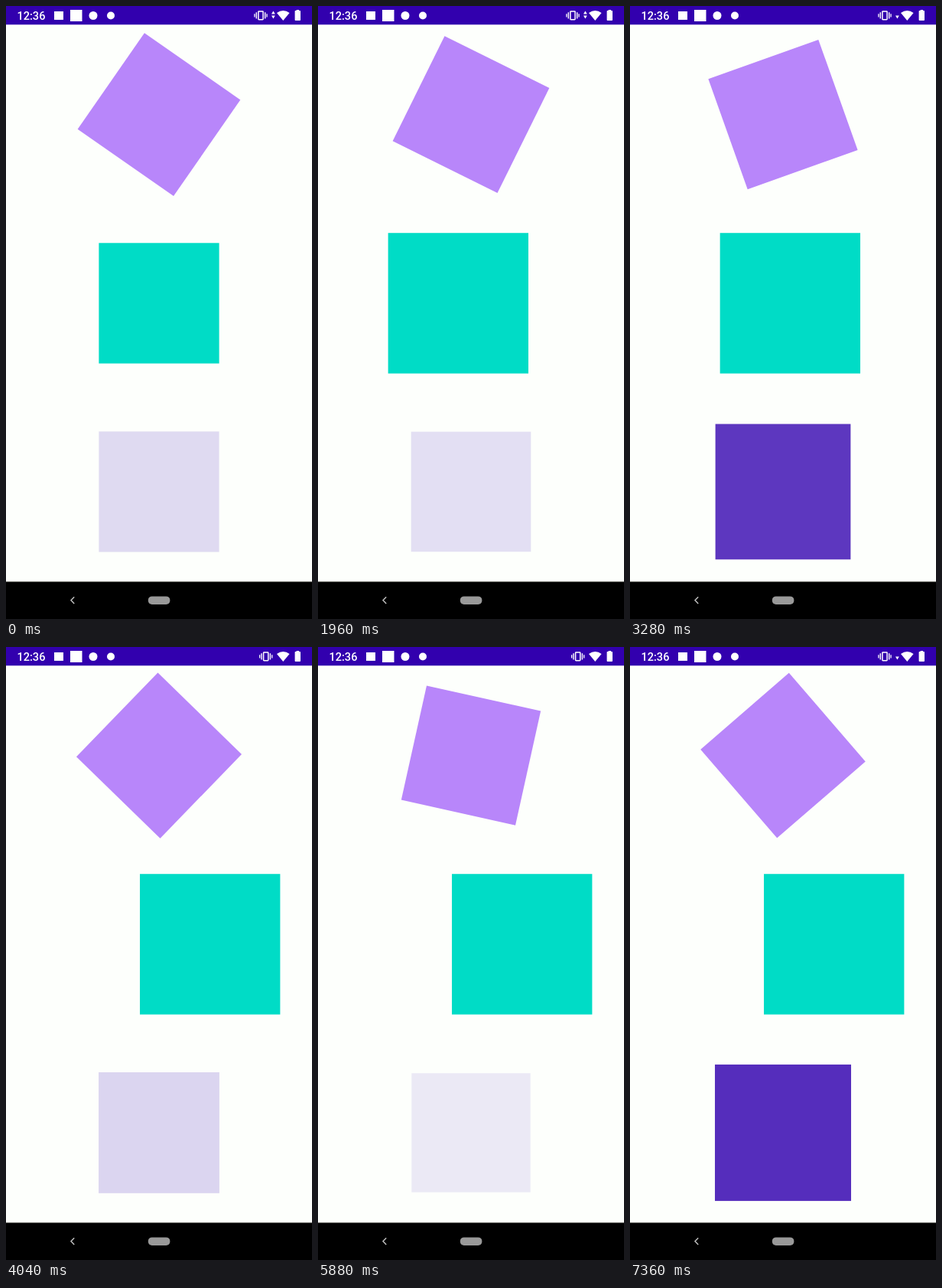
Animation, 400 px wide and 800 px high, one loop 7.4 s. Source, as an HTML page:

```html
<!DOCTYPE html>
<html lang="en">
<head>
<meta charset="utf-8">
<title>Animated squares</title>
<style>
  html, body { margin: 0; width: 100%; height: 100%; overflow: hidden; background: #fdfffc; }
  svg { display: block; width: 400px; height: 800px; }
  .clock { font: 500 14.6px Roboto, sans-serif; fill: #fff; }
</style>
</head>
<body>
<svg viewBox="0 0 400 800">
  <rect width="400" height="800" fill="#fdfffc"/>

  <rect id="spin" x="-76.4" y="-76.4" width="152.8" height="152.8" fill="#b886fa"/>
  <rect id="slide" x="-76.4" y="-76.4" width="152.8" height="152.8" fill="#00dcc6"/>
  <rect id="fade" x="-76.4" y="-76.4" width="152.8" height="152.8" fill="#3200af"/>

  <!-- status bar -->
  <rect width="400" height="24.3" fill="#3200ae"/>
  <text class="clock" x="14.4" y="18">12:36</text>
  <g fill="#fff">
    <rect x="63" y="7" width="12" height="11"/>
    <rect x="84" y="5" width="15.5" height="15"/>
    <circle cx="114" cy="12.5" r="5.5"/>
    <circle cx="137" cy="12.5" r="5"/>
    <g id="vibrate">
      <rect x="-3.1" y="6.9" width="6.2" height="10.8" rx=".6" fill="none" stroke="#fff" stroke-width="1.5"/>
      <path d="M-6.4 8.2h1.4v8.2h-1.4zM5 8.2h1.4v8.2H5zM-8.7 10.2h1.3v4.2h-1.3zM7.4 10.2h1.3v4.2H7.4z"/>
    </g>
    <path id="up" d="M347 10.6L349.4 6.6L351.8 10.6Z"/>
    <path id="down" d="M347 12.6L349.4 16.6L351.8 12.6Z"/>
    <path d="M354 8.9Q362.3 2.9 370.6 8.9L362.3 19Z"/>
    <path d="M379.6 6V5h3.4V6H384.2Q385 6 385 6.9V18.1Q385 19 384.2 19H378.4Q377.6 19 377.6 18.1V6.9Q377.6 6 378.4 6Z"/>
  </g>

  <!-- navigation bar -->
  <rect y="750.4" width="400" height="1.2" fill="#dfe0da"/>
  <rect y="751.4" width="400" height="48.6" fill="#000"/>
  <path d="M89.2 771.3L85 775.6L89.2 779.9" fill="none" stroke="#bdbdbd" stroke-width="1.5"/>
  <rect x="185.8" y="770.4" width="28.6" height="10.6" rx="5" fill="#999"/>
</svg>
<script>
  const LOOP = 7400, STEP = 40, LEAD = 290, CYCLE = 2000, SHIFT = 66.7;
  const $ = id => document.getElementById(id);
  const clamp = v => Math.min(1, Math.max(0, v));

  function place(id, x, y, extra) {
    $(id).setAttribute('transform', `translate(${x} ${y}) ${extra}`);
  }
  const show = (id, on) => $(id).setAttribute('visibility', on ? 'visible' : 'hidden');

  function draw(t) {
    const e = t + LEAD;
    const p = e % CYCLE / CYCLE;

    // half turn and back, eased
    const angle = 90 * (1 - Math.cos(2 * Math.PI * p));
    place('spin', 200, 141.6, `rotate(${angle})`);

    // grow, then left, then right, then rest
    const grow = 1 + 0.2 * clamp(e / 2000);
    const x = 200 - SHIFT * clamp((e - 2000) / 1000) + 2 * SHIFT * clamp((e - 3000) / 1000);
    place('slide', x, 387.9, `scale(${grow})`);

    // grow and fade in, restarting
    place('fade', 200, 633.9, `scale(${1 + 0.2 * p})`);
    $('fade').setAttribute('opacity', p);

    // network activity
    const idle = t >= 3560 && t < 6480;
    show('up', t < 2680);
    show('down', !idle);
    place('vibrate', idle ? 339.7 : 333, 0, '');
  }

  const start = performance.now();
  function tick() {
    const t = (performance.now() - start) % LOOP;
    draw(Math.floor(t / STEP) * STEP);
    requestAnimationFrame(tick);
  }
  draw(0);
  requestAnimationFrame(tick);
</script>
</body>
</html>
```
